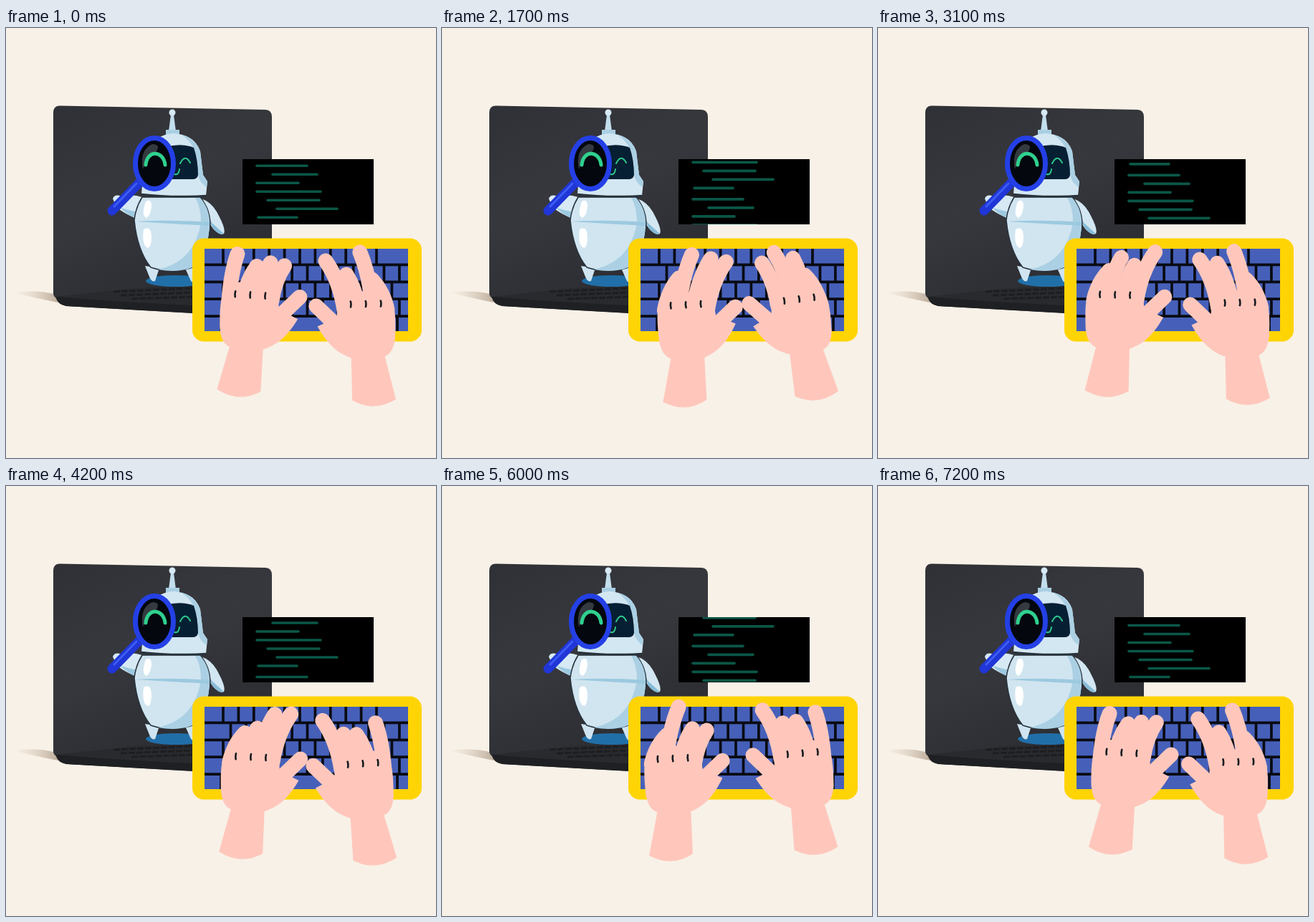
An HTML page for the animation above (7.3 s loop, 600 by 600 pixels).

```html
<!DOCTYPE html>
<html lang="en">
<head>
<meta charset="utf-8">
<title>Robot and typing hands</title>
<style>
html, body { margin: 0; width: 100%; height: 100%; overflow: hidden; background: #f8f1e7; }
svg { display: block; width: 100%; height: 100%; }
</style>
</head>
<body>
<svg id="stage" viewBox="0 0 600 600">
  <defs>
    <linearGradient id="lid" x2=".5" y2="1"><stop stop-color="#303136"/><stop offset=".5" stop-color="#37383d"/><stop offset="1" stop-color="#2c2d32"/></linearGradient>
    <linearGradient id="shade"><stop stop-color="#d9c8b4" stop-opacity="0"/><stop offset="1" stop-color="#b5a594"/></linearGradient>
    <clipPath id="panel"><path d="M330 183H513V274H330Z"/></clipPath>
    <clipPath id="board"><path d="M277 308H561V423H277Z"/></clipPath>
  </defs>

  <g id="laptop">
    <path d="M10 369Q45 365 70 372L78 384Q45 378 10 369Z" fill="url(#shade)"/>
    <path d="M66 118Q66 108 76 108.500L362 114Q371 114.500 371 124V380L80 380Q66 378 66 370Z" fill="url(#lid)"/>
    <path d="M69 375L180 363L371 356V400L262 398L84 388Q72 386 69 375Z" fill="#292a2e"/>
    <path d="M70 375Q150 382 300 389V400L84 388Q72 386 70 375Z" fill="#1f2023"/>
    <path d="M150 368L262 363M160 373L262 369M175 378L262 375" stroke="#1d1e21" stroke-width="3" stroke-dasharray="9 2"/>
  </g>

  <g id="robot">
    <ellipse cx="237" cy="353" rx="42" ry="8" fill="#216fa8"/>
    <path d="M194 332L214 335L208 353Q203 355 200 347ZM249 333L264 330V358L258 353Z" fill="#cfe4f0"/>
    <path d="M272 238Q288 243 297 262Q307 281 304 287Q298 290 289 280Q275 262 272 238Z" fill="#d3e7f2"/>
    <path d="M283 268Q297 281 304 287Q298 290 289 280Z" fill="#86bbd8"/>
    <path d="M149 238Q152 231 161 235Q176 231 190 236L182 266Q165 259 154 250Z" fill="#d6e9f4"/>
    <path d="M160 251Q170 254 184 257L182 266Q168 260 160 251Z" fill="#9cc9e0"/>
    <path d="M190 236H271Q284 252 285 271Q284 312 260 334Q232 344 202 334Q183 310 179 268Q181 250 190 236Z" fill="#d0e5f0" stroke="#27323b" stroke-width="1.500"/>
    <path d="M264 237H271Q284 252 284 271Q284 312 260 334Q240 342 212 337Q264 325 272 271Q272 250 264 237Z" fill="#abd0e4"/>
    <path d="M180 270Q230 267 284 271L283 276Q230 273 180 270Z" fill="#9cc9e0"/>
    <path d="M195 242Q203 238 203 248Q202 262 196 265Q188 262 195 242ZM192 281Q202 275 203 290Q203 306 198 307Q189 304 192 281Z" fill="#fff"/>
    <path d="M230 121H234L237 144H227Z" fill="#c3deec"/>
    <circle cx="232" cy="118" r="4.500" fill="#d6e9f4"/>
    <path d="M223 142H242V153H223Z" fill="#a9cfe3"/>
    <path d="M189 232L193 180Q205 148 234 147Q263 149 271 172L275 205L281 214L279 234Q232 237 189 232Z" fill="#d3e7f2"/>
    <path d="M245 149Q264 153 271 172L275 205L281 214L280 222Q270 216 268 205Q270 165 245 149Z" fill="#abd0e4"/>
    <path d="M189 232Q232 237 279 234" fill="none" stroke="#27323b" stroke-width="2.500"/>
    <path d="M222 166Q246 160 262 167Q268 184 268 205Q267 211 260 211H224Z" fill="#071f33"/>
    <path d="M243 189Q250 175 257 188M235 204Q241 206 242 197" fill="none" stroke="#2fc98c" stroke-width="2" stroke-linecap="round"/>
    <g stroke-linecap="round" fill="none">
      <path d="M185 217L148 255" stroke="#2036d6" stroke-width="13"/>
      <path d="M182 217L151 249" stroke="#3d5cf5" stroke-width="3"/>
      <ellipse cx="207" cy="189" rx="26.500" ry="35.500" fill="#04070d" stroke="#2440e6" stroke-width="7"/>
      <path d="M191 197Q186 170 204 162Q216 162 210 172Q197 180 191 197Z" fill="#343a40"/>
      <path d="M195 191C197 169 220 171 222 191" stroke="#2fd08e" stroke-width="5"/>
    </g>
  </g>

  <path d="M330 183H513V274H330Z"/>
  <g clip-path="url(#panel)"><g id="code" stroke="#0b5747" stroke-width="3.600" stroke-linecap="round"/></g>

  <rect x="260" y="293.500" width="320" height="144" rx="16" fill="#ffd404"/>
  <path d="M277 308H561V423H277Z" fill="#4660b9"/>
  <path id="seams" clip-path="url(#board)" stroke="#090b12" stroke-width="3.700"/>
</svg>
<script>
const LOOP = 7300, CYCLE = LOOP / 2, BLOCK = 87.5, SKIN = '#ffc7bc';
const $ = id => document.getElementById(id);

function add(parent, tag, attrs) {
  const node = document.createElementNS('http://www.w3.org/2000/svg', tag);
  for (const name in attrs) node.setAttribute(name, attrs[name]);
  return parent.appendChild(node);
}

// Each code line: left and right end
const lines = [[350, 420], [372, 434], [350, 408], [350, 439], [365, 437], [378, 462], [352, 406]];
for (let block = 0; block < 3; block++)
  lines.forEach(([left, right], i) => add($('code'), 'path',
    { d: `M${left} ${192.2 + i * 12 + block * BLOCK}H${right}` }));

let seams = '';
for (let row = 0; row < 5; row++) {
  const y = 306.5 + row * 23.9, space = row === 4;
  if (row) seams += `M277 ${y}H561`;
  for (let x = space ? 300 : 303 + row % 2 * 10.5; x < 550; x += space ? 246 : 21.4)
    if (row || x < 520) seams += `M${x} ${y}v24`;
}
$('seams').setAttribute('d', seams);

const wave = (phase, peak, order = 1) => Math.cos(2 * Math.PI * order * (phase - peak));

// How far a finger is raised near any of its cyclic peaks, 0 to 1
function raised(phase, peaks) {
  const sum = peaks.reduce((total, peak) => {
    const gap = phase - peak - Math.round(phase - peak);
    return total + Math.exp(-((gap / 0.08) ** 2));
  }, 0);
  return Math.min(1, sum);
}

// Base, resting tip and raised tip, from little finger to thumb
const fingerShapes = [
  [-30, 8, -8, -33, -18, -57],
  [-10, 8, 9, -40, 8, -72],
  [10, 8, 27, -41, 35, -65],
  [30, 8, 47, -39, 56, -60],
  [22, 48, 69, 3, 73, 22]
];
const PALM = 'M-39 134Q-8 152 22 134L22 75C43 67 55 54 68 30L41 18L38 -8' +
  'Q0 -26 -33 -12C-43 3 -41 28 -40 48C-38 62 -34 70 -25 74Z';

function makeHand(side, place, peaks) {
  const hand = add($('stage'), 'g');
  const fingers = fingerShapes.map(() => add(hand, 'path',
    { fill: 'none', stroke: SKIN, 'stroke-width': 21, 'stroke-linecap': 'round' }));
  const palm = add(hand, 'g');
  add(palm, 'path', { d: PALM, fill: SKIN });
  add(palm, 'path', { d: 'M-21 -4q-1 4 0 8M0 -4q-1 4 0 8M21 -4q-1 4 0 8',
    fill: 'none', stroke: '#15191d', 'stroke-width': 2.6, 'stroke-linecap': 'round' });

  return phase => {
    const [x, y, tilt] = place(phase);
    hand.setAttribute('transform', `translate(${x} ${y}) scale(${side} 1)`);
    palm.setAttribute('transform', `rotate(${tilt})`);
    fingers.forEach((finger, i) => {
      const [baseX, baseY, restX, restY, topX, topY] = fingerShapes[i];
      const lift = raised(phase, peaks[i]);
      const tipX = restX + (topX - restX) * lift, tipY = restY + (topY - restY) * lift;
      const bendX = baseX + (tipX - baseX) * (i < 4 ? 0.25 : 0.6);
      finger.setAttribute('d',
        `M${baseX} ${baseY}Q${bendX} ${baseY + (tipY - baseY) * 0.6} ${tipX} ${tipY}`);
    });
  };
}

const hands = [
  makeHand(1, p => [
    336 + 11 * wave(p, 0.22) + 4.5 * wave(p, 0.43, 2),
    379 + 7.5 * wave(p, 0.42),
    3.3 * wave(p, 0.03)
  ], [[0, 0.36], [0.49, 0.63, 0.77], [0.11, 0.48], [0.15, 0.47, 0.86], []]),
  makeHand(-1, p => [
    500.5 + 4.5 * wave(p, 0.8),
    382 + 7.2 * wave(p, 0.14) + 3 * wave(p, 0.33, 2),
    4 + 3 * wave(p, 0.42)
  ], [[0.14, 0.64], [0.87, 0.99, 0.53], [0.47, 0.79], [0, 0.14, 0.53, 0.65, 0.85], [0.36]])
];

const start = performance.now();
function draw() {
  const phase = (performance.now() - start) / CYCLE % 1;
  $('code').setAttribute('transform', `translate(0 ${-phase * BLOCK})`);
  hands.forEach(update => update(phase));
  requestAnimationFrame(draw);
}
draw();
</script>
</body>
</html>
```
